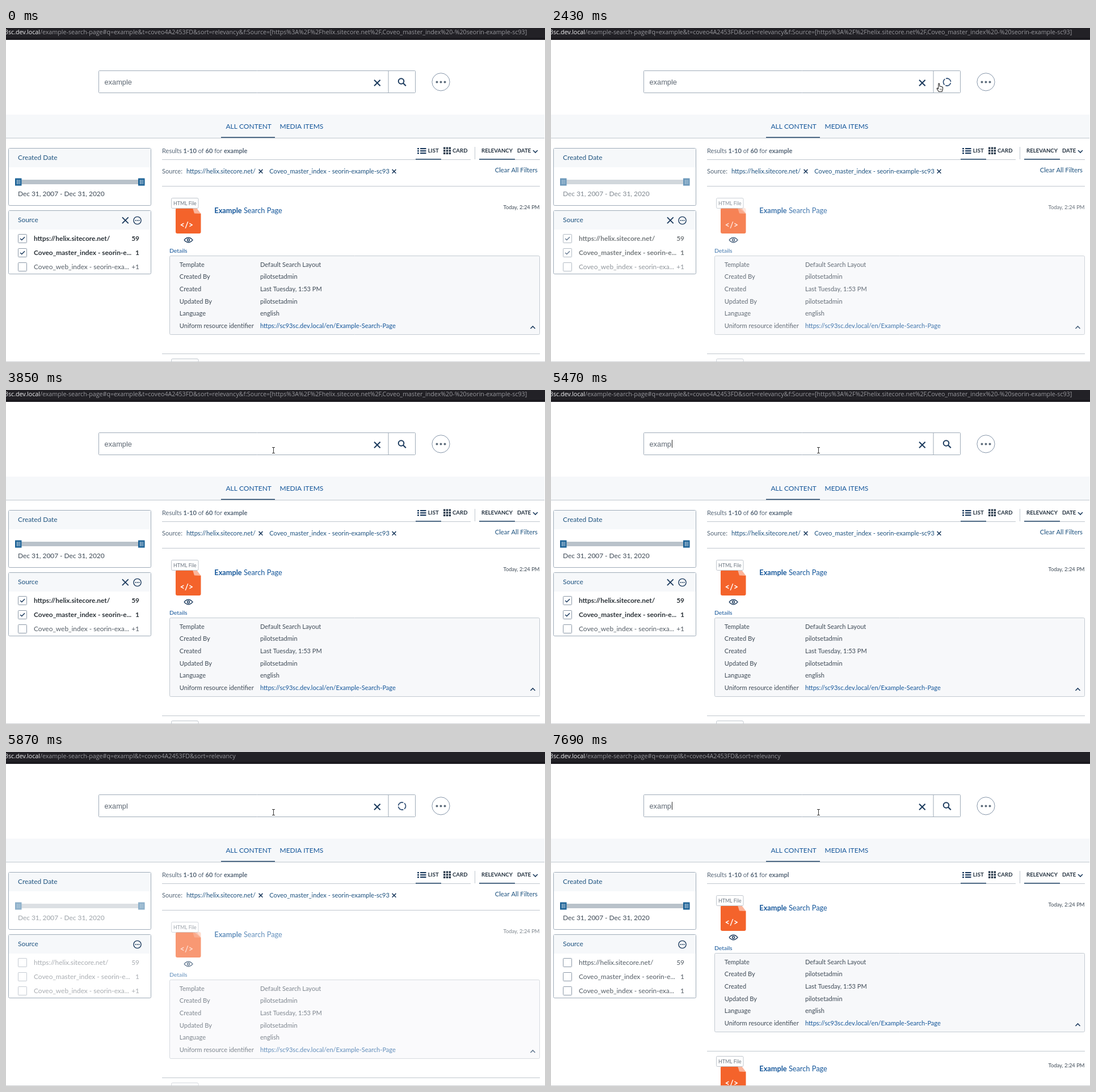
Write an HTML page with a canvas that moves like this. It is 950 px wide and 590 px high and loops after 8 s.

```html
<!DOCTYPE html>
<html lang="en">
<head>
<meta charset="utf-8">
<title>Search page</title>
<style>
html, body { margin: 0; width: 100%; height: 100%; overflow: hidden; background: #fff; }
canvas { display: block; }
</style>
</head>
<body>
<canvas id="stage" width="950" height="590"></canvas>
<script>
const ctx = document.getElementById('stage').getContext('2d');
const LOOP = 8000;
const NAVY = '#1c3b5e', LINK = '#14569a', LABEL = '#1d527f', INK = '#3e4a56', EDGE = '#9eabb8', RULE = '#c0c7ce', PALE = '#f6f8fa';
const LATO = 'Lato, sans-serif', URLFONT = '"Open Sans", sans-serif', ARIAL = '"Liberation Sans", Arial, sans-serif';
const SMALL = 11.05, BODY = 11.9;
const INDEX = 'Coveo_master_index - seorin-';

// Value of the last step whose start time has passed
function stepAt(t, steps) {
  let value = steps[0][1];
  for (const [start, v] of steps) if (t >= start) value = v;
  return value;
}
const within = (t, a, b) => t >= a && t < b;

function rect(x, y, w, h, color) {
  ctx.fillStyle = color;
  ctx.fillRect(x, y, w, h);
}

function panel(x, y, w, h, r, fill, edge) {
  ctx.beginPath();
  ctx.roundRect(x + .5, y + .5, w, h, r);
  ctx.fillStyle = fill;
  ctx.fill();
  if (!edge) return;
  ctx.strokeStyle = edge;
  ctx.lineWidth = 1;
  ctx.stroke();
}

function path(points, color, width, close) {
  ctx.beginPath();
  points.forEach(([x, y]) => ctx.lineTo(x, y));
  if (close) ctx.closePath();
  ctx.strokeStyle = color;
  ctx.lineWidth = width;
  ctx.stroke();
}

function shape(points, color) {
  ctx.beginPath();
  points.forEach(([x, y]) => ctx.lineTo(x, y));
  ctx.closePath();
  ctx.fillStyle = color;
  ctx.fill();
}

function ring(x, y, r, color, width) {
  ctx.beginPath();
  ctx.arc(x, y, r, 0, Math.PI * 2);
  ctx.strokeStyle = color;
  ctx.lineWidth = width;
  ctx.stroke();
}

function dot(x, y, r, color) {
  ctx.beginPath();
  ctx.arc(x, y, r, 0, Math.PI * 2);
  ctx.fillStyle = color;
  ctx.fill();
}

function text(s, x, y, size, color, { weight = 400, align = 'left', font = LATO } = {}) {
  ctx.font = `${weight} ${size}px ${font}`;
  ctx.textAlign = align;
  ctx.fillStyle = color;
  ctx.fillText(s, x, y);
  return x + ctx.measureText(s).width;
}

// Parts between asterisks are bold
function rich(s, x, y, size, color) {
  s.split('*').forEach((part, i) => {
    x = text(part, x, y, size, color, { weight: i % 2 ? 700 : 400 });
  });
}

function cross(x, y, r, width) {
  path([[x - r, y - r], [x + r, y + r]], NAVY, width);
  path([[x + r, y - r], [x - r, y + r]], NAVY, width);
}

function chevron(x, y, dir, color = NAVY) {
  path([[x - 4, y - 2 * dir], [x, y + 2 * dir], [x + 4, y - 2 * dir]], color, 1.6);
}

function faded(alpha, draw) {
  ctx.save();
  ctx.globalAlpha = alpha;
  draw();
  ctx.restore();
}

function addressBar(filtered) {
  rect(0, 0, 950, 21, '#1b1a1f');
  rect(0, 0, 950, 17, '#222126');
  const rest = filtered
    ? '/example-search-page#q=example&t=coveo4A2453FD&sort=relevancy&f:Source=[https%3A%2F%2Fhelix.sitecore.net%2F,Coveo_master_index%20-%20seorin-example-sc93]'
    : '/example-search-page#q=exampl&t=coveo4A2453FD&sort=relevancy';
  text('3sc.dev.local', 60, 11, 10.7, '#f4f4f6', { align: 'right', font: URLFONT });
  text(rest, 60, 11, 10.7, '#98989d', { font: URLFONT });
}

function spinner(x, y, turn) {
  for (let i = 0; i < 3; i++) {
    const a = (turn + i / 3) * Math.PI * 2;
    ctx.beginPath();
    ctx.arc(x, y, 6.5, a, a + 1.8);
    ctx.strokeStyle = '#3b587c';
    ctx.lineWidth = 1.8;
    ctx.stroke();
  }
}

function searchBox(t, query, loading) {
  panel(163, 75, 558, 39, 1, '#fff', EDGE);
  rect(673.5, 76, 1, 38, EDGE);
  text(query, 173.5, 99.5, 12.8, '#5d6772', { font: ARIAL });
  const caret = within(t, 3210, 3850) || within(t, 4430, 4850) || within(t, 5470, 5700) || t >= 7690;
  if (caret) rect(query === 'example' ? 221 : 213, 88, 1, 14, '#333');
  cross(654.3, 97, 5.3, 2);
  if (loading) {
    spinner(698, 95.5, t / 900);
  } else {
    const color = stepAt(t, [[0, NAVY], [1820, '#eaa60c'], [2620, '#e08f1c'], [2840, NAVY]]);
    ring(696.5, 94, 4.8, color, 2);
    path([[700, 97.5], [704.8, 102.3]], within(t, 1820, 2840) ? '#8b6c33' : color, 2.2);
  }
  ring(766.5, 95.3, 15.6, '#8494a8', 1);
  for (const dx of [-7, 0, 7]) dot(766.5 + dx, 95.5, 2, '#5c6b7a');
}

function tabs() {
  rect(0, 153, 949, 41, PALE);
  rect(0, 194, 949, 1, RULE);
  rect(379, 192.5, 95, 1.5, '#284a6c');
  text('ALL CONTENT', 387.5, 178, 12, LINK);
  text('MEDIA ITEMS', 482.5, 178, 12, LINK);
}

function facet(y, h, title) {
  panel(4, y, 251, h, 2, '#fff', EDGE);
  rect(5, y + 1, 250, 33, PALE);
  text(title, 21, y + 21.3, BODY, LABEL);
}

function dateFacet(alpha) {
  facet(212, 101, 'Created Date');
  faded(alpha, () => rect(22, 268, 217, 8, '#b9c2ca'));
  for (const x of [16, 233]) {
    rect(x, 265.5, 11.5, 13, '#fff');
    faded(alpha, () => {
      rect(x, 265.5, 11.5, 13, '#1c6296');
      for (const dx of [3, 5.4, 7.8]) rect(x + dx, 268, .8, 8, '#fff');
    });
  }
  faded(alpha, () => text('Dec 31, 2007 - Dec 31, 2020', 21, 297.3, BODY, INK));
}

function sourceFacet(alpha, filtered, extra) {
  facet(322, 112, 'Source');
  if (filtered) cross(210.3, 339.7, 5.4, 1.8);
  ring(231.5, 340, 6.6, NAVY, 1.4);
  for (const dx of [-3, 0, 3]) dot(231.5 + dx, 340, 1, NAVY);
  const rows = [
    ['https://helix.sitecore.net/', '59'],
    [INDEX + 'e...', '1'],
    ['Coveo_web_index - seorin-exa...', extra]
  ];
  faded(alpha, () => rows.forEach(([name, count], i) => {
    const y = 364 + i * 25, on = filtered && i < 2;
    const style = { weight: on ? 700 : 400 }, color = on ? '#2b3238' : '#535c65';
    panel(21, y, 15, 15, 1, '#fff', '#8b98a7');
    if (on) path([[25, y + 8], [27.8, y + 10.5], [33, y + 5.2]], NAVY, 1.5);
    text(name, 49, y + 12, BODY, color, style);
    text(count, 235, y + 12, BODY, color, { ...style, align: 'right' });
  }));
}

function resultsHeader(filtered) {
  rich(filtered ? 'Results *1-10* of *60* for *example*' : 'Results *1-10* of *61* for *exampl*', 275, 220.7, SMALL, '#566677');
  rect(275, 232, 544, 1, RULE);
  rect(834, 232, 107, 1, RULE);
  rect(722, 231, 45, 1.5, '#284a6c');
  rect(834, 231, 63, 1.5, '#284a6c');
  rect(826, 210, 1, 22, RULE);
  for (let i = 0; i < 3; i++) {
    const y = 212 + i * 4;
    rect(725, y, 3, 2.4, NAVY);
    rect(730, y, 10.5, 2.2, NAVY);
    for (let j = 0; j < 3; j++) rect(771 + j * 4.8, 210.5 + i * 4.6, 3.4, 3.4, '#28394b');
  }
  const caps = { weight: 700 };
  text('LIST', 743.8, 220.3, 9.6, '#22303e', caps);
  text('CARD', 787, 220.3, 9.6, '#22303e', caps);
  text('RELEVANCY', 838, 220.3, 9.6, '#22303e', caps);
  text('DATE', 901, 220.3, 9.6, '#22303e', caps);
  chevron(933, 218, 1);
  if (!filtered) return;
  text('Source:', 275, 256.5, SMALL, '#526475');
  text('https://helix.sitecore.net/', 318, 256.5, SMALL, LABEL);
  cross(449, 253.3, 3.4, 1.5);
  text(INDEX + 'example-sc93', 464.3, 256.5, SMALL, LABEL);
  cross(684, 253.3, 3.4, 1.5);
  text('Clear All Filters', 937, 255.3, 11.3, LABEL, { align: 'right' });
  rect(275, 279, 666, 1, RULE);
}

function fileIcon() {
  panel(298.5, 317.5, 44.5, 45, 3, '#f4632b');
  shape([[330, 317], [345, 317], [345, 329]], '#fff');
  shape([[329, 318], [336, 318], [343.5, 328], [332, 327.5]], '#fbb59b');
  text('</>', 318.3, 353, 14.5, '#fff', { weight: 700, align: 'center' });
  panel(291, 300, 47.5, 18, 2, '#fff', '#bfc6cd');
  text('HTML File', 295, 313.3, 8.8, '#69747f');
}

function eye(x, y) {
  ctx.beginPath();
  ctx.moveTo(x - 7.5, y);
  ctx.quadraticCurveTo(x, y - 8.5, x + 7.5, y);
  ctx.quadraticCurveTo(x, y + 8.5, x - 7.5, y);
  ctx.strokeStyle = NAVY;
  ctx.lineWidth = 1.3;
  ctx.stroke();
  ring(x, y, 2, NAVY, 1.4);
}

function card(alpha, openMark, closeMark) {
  faded(alpha, () => {
    fileIcon();
    rich('*Example* Search Page', 367.3, 327, 12.75, LINK);
    text('Today, 2:24 PM', 940.5, 320, 9.4, INK, { align: 'right' });
    eye(321.5, 374.5);
    text('Details', 288, 396.5, 10.4, LINK);
    panel(288, 402, 652, 139, 2, '#f7f8fa', '#c3cad1');
    const rows = [
      ['Template', 'Default Search Layout'],
      ['Created By', 'pilotsetadmin'],
      ['Created', 'Last Tuesday, 1:53 PM'],
      ['Updated By', 'pilotsetadmin'],
      ['Language', 'english'],
      ['Uniform resource identifier', 'https://sc93sc.dev.local/en/Example-Search-Page']
    ];
    rows.forEach(([key, value], i) => {
      const y = 421.7 + i * 21.6;
      text(key, 305.8, y, SMALL, INK);
      text(value, 448, y, SMALL, i === 5 ? LINK : INK);
    });
  });
  faded(alpha * openMark, () => chevron(328, 394, 1));
  faded(alpha * closeMark, () => chevron(928.5, 529, -1));
  rect(275, 575, 666, 1, RULE);
}

function results(alpha, filtered, openMark, closeMark) {
  const top = filtered ? 0 : -47;
  for (const dy of [0, 284]) {
    ctx.save();
    ctx.translate(0, top + dy);
    card(alpha, openMark, closeMark);
    ctx.restore();
  }
  rect(0, 589, 950, 1, '#cfd2d5');
}

const pointers = {
  arrow() {
    const p = [[0, 0], [0, 11], [2.6, 8.6], [4.3, 12.4], [6, 11.6], [4.4, 8], [7.7, 7.8]];
    shape(p, '#fff');
    path(p, '#222', .9, true);
  },
  hand() {
    const p = [[3.5, 1], [5, 1], [5.6, 6], [8.5, 6.4], [11, 7.5], [11, 11], [9.6, 15.5], [4, 15.5], [.6, 10.2], [1.4, 9], [3.2, 10.4]];
    shape(p, '#fff');
    path(p, '#2b2b2b', 1.1, true);
    path([[6.5, 10], [6.5, 13]], '#555', .8);
    path([[8.5, 10], [8.5, 13]], '#555', .8);
  },
  beam() {
    rect(-.5, -5, 1, 10, '#333');
    rect(-2.5, -5.5, 5, 1, '#333');
    rect(-2.5, 4.5, 5, 1, '#333');
  }
};

function pointer(t) {
  const spot = stepAt(t, [
    [0, null],
    [1410, ['arrow', 838, 160]],
    [1590, ['arrow', 731, 102]],
    [1820, ['hand', 679.5, 97]],
    [2840, ['beam', 590, 109]],
    [3030, ['beam', 466, 108]],
    [3210, ['beam', 476.5, 109]],
    [3430, ['beam', 471.5, 106.5]]
  ]);
  if (!spot) return;
  const [kind, x, y] = spot;
  ctx.save();
  ctx.translate(x, y);
  pointers[kind]();
  ctx.restore();
}

function draw(t) {
  const filtered = t < 6090;
  const loading = within(t, 2430, 2620) || within(t, 5700, 6090);
  const side = stepAt(t, [[0, 1], [2430, .65], [2620, 1], [5700, .5], [6090, 1]]);
  const list = stepAt(t, [[0, 1], [2430, .8], [2620, 1], [5700, .95], [5870, .66], [6090, 1]]);
  const openMark = stepAt(t, [[0, 0], [2620, 1], [2840, .5], [3030, 0], [6090, .7], [6280, .25], [6460, 0]]);
  const closeMark = stepAt(t, [[0, 1], [2620, 0], [3030, 1], [6090, 0], [6280, .5], [6460, 1]]);
  rect(0, 0, 950, 590, '#fff');
  addressBar(t < 5700);
  searchBox(t, t < 4660 ? 'example' : 'exampl', loading);
  tabs();
  dateFacet(side);
  sourceFacet(side, t < 5700, filtered ? '+1' : '1');
  resultsHeader(filtered);
  results(list, filtered, openMark, closeMark);
  pointer(t);
}

function frame() {
  draw(performance.now() % LOOP);
  requestAnimationFrame(frame);
}
frame();
</script>
</body>
</html>
```
